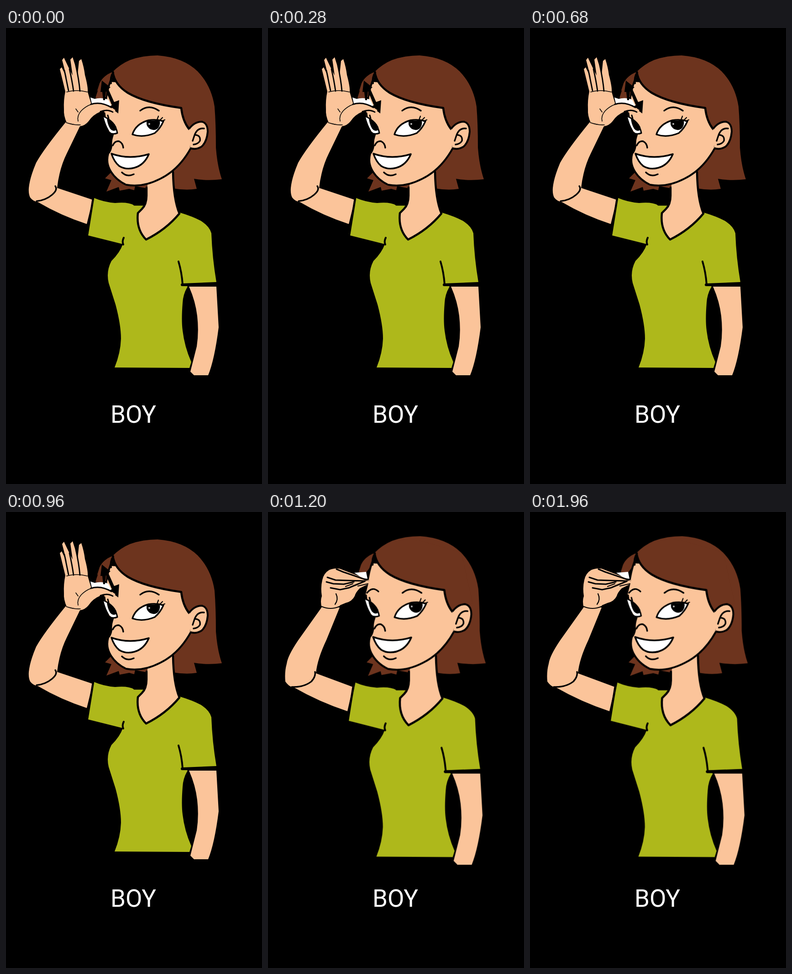
Recreate the animation shown at these times as an HTML page. Size 561 px wide and 998 px high, loop 2000 ms.

```html
<!DOCTYPE html>
<html lang="en">
<head>
<meta charset="utf-8">
<title>Sign: boy</title>
<style>
  html, body { margin: 0; width: 100%; height: 100%; overflow: hidden; background: #000; }
  svg { display: block; width: 100%; height: 100%; }
  .skin { fill: #fbc49a; }
  .hair { fill: #6d341e; }
  .shirt { fill: #aeb81b; }
  .white { fill: #fff; }
  .ink { fill: none; stroke: #000; stroke-width: 4; stroke-linecap: round; stroke-linejoin: round; }
  .mid { stroke-width: 3.4; }
  .thin { stroke-width: 2.2; }
  .edge { stroke: #000; stroke-width: 4; stroke-linejoin: round; }
  text { font: 400 53px Roboto, "Noto Sans", sans-serif; fill: #fff; text-anchor: middle; }

  /* Two held poses, one second each */
  .body, .open, .closed { animation: 2s step-end infinite; }
  .body { animation-name: shift; }
  .open { animation-name: first; }
  .closed { animation-name: second; }
  @keyframes shift {
    0% { transform: none; }
    50%, 100% { transform: matrix(1.02, 0, 0, 1.027, -5.3, -8.9); }
  }
  @keyframes first { 0% { visibility: visible; } 50%, 100% { visibility: hidden; } }
  @keyframes second { 0% { visibility: hidden; } 50%, 100% { visibility: visible; } }
</style>
</head>
<body>
<svg viewBox="0 0 561 998" preserveAspectRatio="none">
  <rect width="561" height="998"/>

  <g class="body">
    <!-- Hair behind the head -->
    <path class="hair" d="M234 96 Q213 104 205 121 L200 137 L214 140 L231 118Z"/>
    <path class="hair" d="M233 97 Q250 79 272 70 Q300 60 332 60 Q388 64 420 95 Q450 126 457 172 Q460 210 460 262
      Q463 302 473 331 Q442 335 412 330 L418 352 Q395 356 366 351 L309 351 L283 346 L281 355 L270 352 L249 356
      L247 348 L220 358 L231 333 L217 329 L231 315 L290 250Z"/>

    <!-- Shirt and lowered arm -->
    <path class="skin" d="M401 566 Q415 597 419 630 Q423 665 418 697 L404 752 L412 760 L443 760 Q457 726 466 655 L461 566Z"/>
    <path class="shirt" d="M193 372 Q214 381 239 383 Q267 380 281 388 Q294 386 303 388 L381 404 Q408 412 427 422
      Q446 434 450 449 Q452 503 461 556 L388 559 L398 566 Q388 582 387 602 Q384 640 387 662 Q391 697 406 731
      L402 744 L238 743 Q251 711 252 680 Q252 650 240 605 L225 558 Q219 533 231 510 Q250 491 256 473 L176 453Z"/>
    <path class="ink" d="M378 511 Q385 534 387 561"/>
    <path class="ink" d="M386 562 H462" style="stroke-width:6"/>
    <path class="ink" d="M258 459 Q254 467 257 474"/>
    <path class="ink mid" d="M281 387 L302 387"/>

    <!-- Neck -->
    <path class="skin" d="M310 330 V367 Q308 385 300 395 L289 406 Q287 441 307 462 Q350 439 379 407 Q366 374 366 300Z"/>
    <path class="ink" d="M308 349 V367 Q308 386 298 396 L289 405 Q285 441 307 463 Q351 441 380 406 Q367 375 366 315" style="stroke-width:4.5"/>

    <!-- Face -->
    <path class="skin edge" d="M229 116 Q222 134 218 164 L213 184 Q214 204 225 228 L234 234 Q229 248 231 259 Q229 270 224 275
      Q219 293 227 309 Q238 331 263 343 Q299 350 338 330 Q379 310 405 263 L412 210 L384 172 L300 120Z"/>
    <path class="hair" d="M233 97 Q272 56 340 72 L420 95 L445 205 L432 202 Q412 203 400 220 Q387 203 384 175 Q304 164 267 142 Q238 124 233 97Z"/>
    <path class="ink" d="M234 96 Q238 124 267 142 Q304 164 384 175 Q387 203 401 221" style="stroke-width:4.5"/>
    <path class="ink" d="M235 97 Q228 108 230 121"/>

    <!-- Ear -->
    <path class="skin edge" d="M401 221 Q413 205 429 205 Q442 208 442 227 Q440 250 428 260 Q416 267 404 263"/>
    <path class="ink mid" d="M434 220 Q419 218 413 235 L409 247 M415 234 Q427 235 425 247 Q421 254 411 255"/>

    <!-- Eyes and brow -->
    <path class="white" d="M214 195 Q236 204 242 217 L245 230 L232 231 Q221 222 214 195Z"/>
    <path d="M221 197 Q236 204 242 217 L242 223 Q234 228 228 220 Q222 210 221 197Z"/>
    <path class="ink" d="M213 193 Q240 205 244 230 Q234 234 225 229 M217 194 L216 186 M225 198 L223 191" style="stroke-width:3"/>
    <path class="white" d="M277 233 Q284 210 312 202 L345 203 Q338 220 326 230 Q300 241 277 233Z"/>
    <path d="M309 203 L337 202 Q339 215 331 221 Q323 226 314 220 Q305 212 309 203Z"/>
    <circle cx="314" cy="210" r="2" fill="#bbb"/>
    <path class="ink mid" d="M277 233 Q284 210 312 202 Q329 199 345 204 Q338 220 326 230 Q300 241 277 233Z"/>
    <path class="ink thin" d="M331 201 L334 193 M337 202 L343 196 M341 204 L348 201"/>
    <path class="ink mid" d="M294 181 Q313 166 335 181"/>

    <!-- Nose and mouth -->
    <path class="ink mid" d="M234 257 Q239 246 248 248 Q256 252 257 262"/>
    <path class="white edge" d="M231 275 Q270 289 313 276 Q303 300 281 306 Q262 311 248 302 Q237 293 231 275Z" style="stroke-width:3.6"/>
    <path class="ink mid" d="M254 316 Q265 327 280 320"/>
  </g>

  <!-- Open hand -->
  <g class="open">
    <path class="hair" d="M205 125 L196 153 L206 157 L219 151 L222 124Z"/>
    <path class="white" d="M185 152 L194 155 Q211 151 224 157 L232 173 Q207 160 189 169Z"/>
    <path d="M210 115 L229 130 L224 133 L237 162 L248 158 L246 187 L226 172 L232 169 L219 138 L217 158 L213 158 L211 140 L207 140Z"/>
    <path class="skin" d="M131 206 Q82 266 66 295 Q52 328 50 350 Q49 363 53 371 Q59 379 70 381 Q119 410 177 429 L190 376
      L112 350 Q117 307 133 275 L163 213Z"/>
    <path class="skin" d="M133 207 Q126 192 127 178 Q126 157 130 139 L118 90 L122 86 L133 109 L123 70 L127 65 L137 86
      L146 104 L141 69 L146 64 L152 83 L157 101 L160 72 L165 68 Q171 86 173 103 Q180 129 179 140 L187 167
      Q208 160 230 173 L240 180 L234 186 Q222 177 207 183 Q190 190 181 204 Q173 214 162 215 Q147 208 133 207Z"/>
    <path class="ink" d="M137 137 L128 93 M148 138 Q145 116 139 90 M162 138 Q160 114 153 82" style="stroke-width:2.8"/>
    <path class="ink" d="M133 140 Q154 134 178 140 M187 167 Q175 171 165 181 Q155 192 158 204 M153 177 L158 184 M132 207 Q148 213 163 212"
      style="stroke-width:1.6"/>
    <path class="ink" d="M186 167 Q208 160 231 174 M234 184 Q222 177 207 183" style="stroke-width:3"/>
    <path class="ink mid" d="M108 346 Q114 354 101 365 Q87 377 67 379"/>
    <path class="ink" d="M191 373 L178 453" style="stroke-width:4.5"/>
  </g>

  <!-- Closed hand -->
  <g class="closed">
    <path class="ink mid" d="M217 177 Q229 162 242 174"/>
    <path class="white" d="M189 133 L215 131 L218 146 L207 145Z"/>
    <path class="skin" d="M118 208 L66 281 Q43 315 41 332 Q36 350 38 371 Q46 383 57 384 Q113 416 174 436 L186 383 L105 353
      Q108 322 128 280 L157 209Z"/>
    <path class="skin" d="M118 210 Q114 195 118 184 Q115 165 119 149 Q122 134 134 127 Q145 122 157 124 L188 136 L220 149
      L221 157 L201 167 Q192 176 190 184 Q184 196 170 199 L158 204 L151 213 Q133 207 118 210Z"/>
    <path class="ink" d="M150 125 L164 131 L217 149 M130 143 L148 149 L178 150 L213 151 M128 153 L143 157 L166 158 L188 153
      M137 166 L158 170 L177 166 L211 152" style="stroke-width:3"/>
    <path class="ink thin" d="M186 157 L170 163 M197 162 L219 157"/>
    <path class="ink thin" d="M149 179 Q155 191 147 202 M118 207 Q137 215 156 207"/>
    <path class="ink mid" d="M103 350 Q105 360 95 371 Q78 384 52 383"/>
    <path class="ink" d="M188 375 L175 456" style="stroke-width:4.5"/>
  </g>

  <text x="279" y="864">BOY</text>
</svg>
</body>
</html>
```
